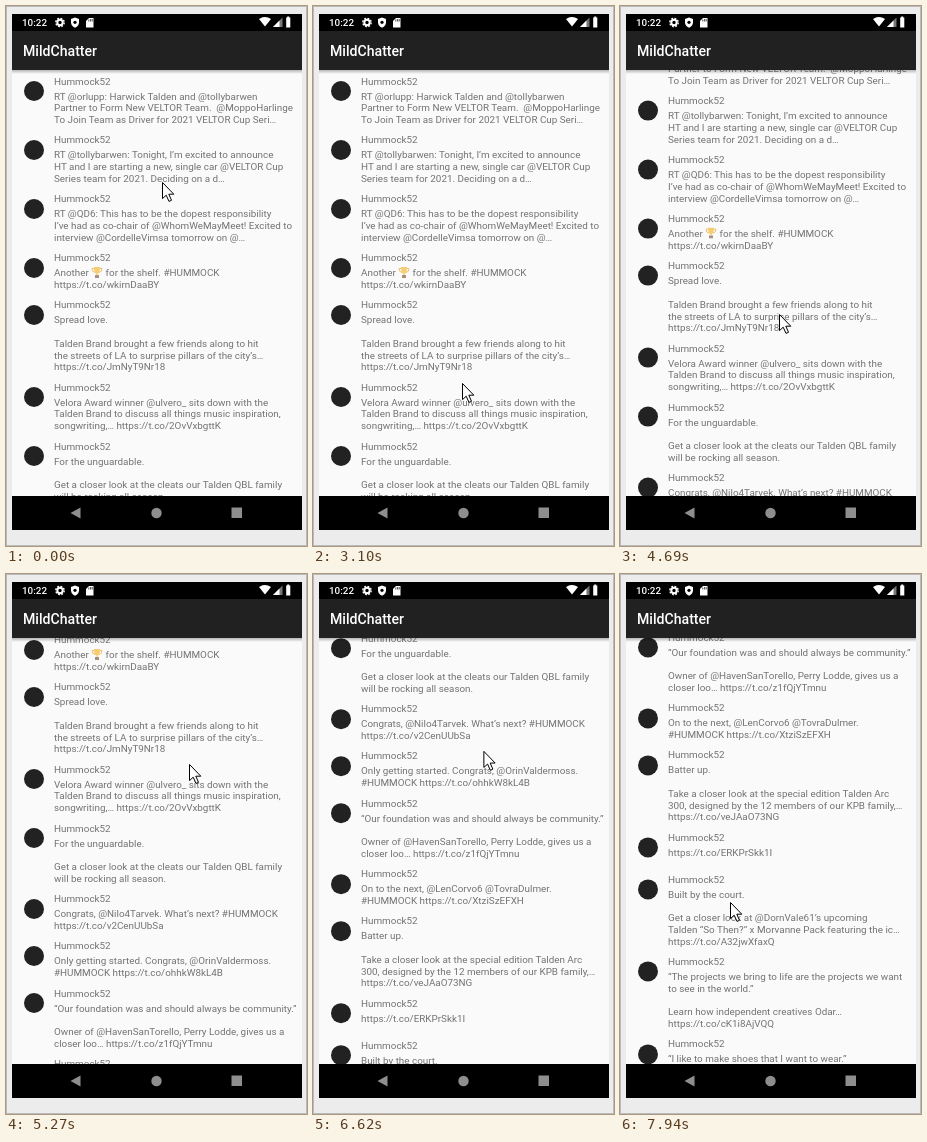
Recreate the animation shown at these times as an HTML page. Size 301x540 px, loop 8 s.

```html
<!DOCTYPE html>
<html lang="en">
<head>
<meta charset="utf-8">
<title>Timeline scroll</title>
<style>
html, body { margin: 0; width: 100%; height: 100%; overflow: hidden; background: #ececec; }
#stage { position: relative; width: 301px; height: 540px; overflow: hidden; background: #ececec;
  box-shadow: inset 0 0 0 1px #bbb; font-family: Roboto, sans-serif; }
#stage > * { position: absolute; }
#screen { left: 6px; top: 64px; width: 290px; height: 426px; overflow: hidden; background: #fafafa; }
#screen::after { content: ""; position: absolute; inset: 0 0 auto; height: 4px;
  background: linear-gradient(#0004, #0000); }
#list { margin: 0; padding: 0; list-style: none; }
#list li { position: relative; box-sizing: border-box; padding: 5.6px 0 0 42px;
  font-size: 9.87px; line-height: 11.7px; color: #737373; white-space: pre; }
#list li::before { content: ""; position: absolute; left: 12px; top: 11px;
  width: 20px; height: 20px; border-radius: 50%; background: #222; }
#list p { margin: 3.3px 0 0; }
#list svg { width: 12px; height: 11px; vertical-align: -2px; }
#bar { left: 6px; top: 8px; width: 290px; height: 56px; color: #fff;
  background: linear-gradient(#000 17px, #212121 17px); }
#bar span { position: absolute; font-weight: 500; white-space: pre; }
#clock { left: 10px; top: 2px; font-size: 9.9px; line-height: 13px; }
#title { left: 11px; top: 29px; font-size: 14.1px; line-height: 17px; }
#nav { left: 6px; top: 490px; width: 290px; height: 34px; background: #000; }
#icons, #cursor { left: 0; top: 0; }
</style>
</head>
<body>
<div id="stage">
  <div id="screen"><ul id="list"></ul></div>
  <div id="bar"><span id="clock">10:22</span><span id="title">MildChatter</span></div>
  <div id="nav"></div>
  <svg id="icons" width="301" height="540" fill="#fff">
    <circle cx="54" cy="16.5" r="2.7" fill="none" stroke="#fff" stroke-width="2"/>
    <circle cx="54" cy="16.5" r="4.2" fill="none" stroke="#fff" stroke-width="1.4" stroke-dasharray="1.8 1.5"/>
    <path d="M69 11.5l4 1.6v3.2q0 3.6-4 5.4q-4-1.8-4-5.4v-3.2z"/>
    <circle cx="69" cy="16.3" r="1.6" fill="#000"/>
    <path d="M83 12h4.5v9.5h-7.5v-6.5z"/>
    <path d="M82.8 13.5v2M84.6 13v2.5M86.2 13v2.5" stroke="#000" stroke-width=".7"/>
    <path d="M253 13q6-4 12 0l-6 7.5z"/>
    <path d="M276.5 11.5v9.5h-9.5z" fill="#777"/><path d="M273.5 14.5v6.5h-6.5z"/>
    <path d="M280.2 11.5h1v-1h2v1h1.1v10h-4.1z"/>
    <g fill="#8e8e8e">
      <path d="M64.5 507l10-5.5v11z"/><circle cx="150.5" cy="507" r="5.2"/><path d="M225.5 501.5h10.5v10.5h-10.5z"/>
    </g>
  </svg>
  <svg id="cursor" width="16" height="24" overflow="visible">
    <path d="M.5 .5V16.6L4.2 13.2L7 19.4L9.5 18.3L6.8 12.2H11.8Z" fill="#fff" stroke="#000"/>
  </svg>
</div>
<script>
const trophy = `<svg viewBox="0 0 12 11"><path d="M3 1.5H1q0 3.5 3 4M9 1.5h2q0 3.5-3 4" fill="none"
  stroke="#ecc070"/><path d="M3 0h6q0 6-2.3 6.5V8h-1.4V6.5Q3 6 3 0z" fill="#f5cd70"/><path
  d="M4 8h4v3H4z" fill="#a89080"/></svg>`;

const posts = [
  "RT @orlupp: Harwick Talden and @tollybarwen\nPartner to Form New VELTOR Team.  @MoppoHarlinge\nTo Join Team as Driver for 2021 VELTOR Cup Seri…",
  "RT @tollybarwen: Tonight, I’m excited to announce\nHT and I are starting a new, single car @VELTOR Cup\nSeries team for 2021. Deciding on a d…",
  "RT @QD6: This has to be the dopest responsibility\nI’ve had as co-chair of @WhomWeMayMeet! Excited to\ninterview @CordelleVimsa tomorrow on @…",
  `Another ${trophy} for the shelf. #HUMMOCK\nhttps://t.co/wkirnDaaBY`,
  "Spread love.\n\nTalden Brand brought a few friends along to hit\nthe streets of LA to surprise pillars of the city’s…\nhttps://t.co/JmNyT9Nr18",
  "Velora Award winner @ulvero_ sits down with the\nTalden Brand to discuss all things music inspiration,\nsongwriting,… https://t.co/2OvVxbgttK",
  "For the unguardable.\n\nGet a closer look at the cleats our Talden QBL family\nwill be rocking all season.",
  "Congrats, @Nilo4Tarvek. What’s next? #HUMMOCK\nhttps://t.co/v2CenUUbSa",
  "Only getting started. Congrats, @OrinValdermoss.\n#HUMMOCK https://t.co/ohhkW8kL4B",
  "“Our foundation was and should always be community.”\n\nOwner of @HavenSanTorello, Perry Lodde, gives us a\ncloser loo… https://t.co/z1fQjYTmnu",
  "On to the next, @LenCorvo6 @TovraDulmer.\n#HUMMOCK https://t.co/XtziSzEFXH",
  "Batter up.\n\nTake a closer look at the special edition Talden Arc\n300, designed by the 12 members of our KPB family,…\nhttps://t.co/veJAaO73NG",
  "https://t.co/ERKPrSkk1I",
  "Built by the court.\n\nGet a closer look at @DornVale61’s upcoming\nTalden “So Then?” x Morvanne Pack featuring the ic…\nhttps://t.co/A32jwXfaxQ",
  "“The projects we bring to life are the projects we want\nto see in the world.”\n\nLearn how independent creatives Odar…\nhttps://t.co/cK1i8AjVQQ",
  "“I like to make shoes that I want to wear.”\n"
];

const list = document.getElementById("list");
const cursor = document.getElementById("cursor");
list.innerHTML = posts.map(text => {
  const lines = text.replace(trophy, "").split("\n").length;
  return `<li style="height:${Math.max(42, 23.8 + 11.7 * lines)}px">Hummock52<p>${text}</p></li>`;
}).join("");

const LOOP = 8000, HOP = 140;
const pose = (end, x, y, scroll = 0, power = 1) => ({ end, x, y, scroll, power });
const poses = [
  pose(0, 156, 176), pose(140, 156, 176),
  // waving the pointer over the list
  pose(670, 146, 65), pose(1440, 141, 377), pose(2410, 138, 87), pose(2680, 138, 87),
  pose(3100, 149, 377), pose(3680, 152, 381), pose(4120, 152, 381),
  // first drag, then back down
  pose(4690, 159, 308, 39.4, 2), pose(5270, 183, 190, 186), pose(5660, 154, 351, 186), pose(5800, 154, 351, 186),
  // second drag, ending in a fling
  pose(6210, 168, 214, 281, 1.5), pose(6480, 174, 165, 350), pose(7400, 155, 227, 485.2, .85), pose(7940, 110, 328, 541.6)
];

// Each move runs in even hops of about HOP ms
function poseAt(time) {
  const i = poses.findIndex(p => p.end > time);
  if (i < 0) return poses.at(-1);
  const a = poses[i - 1], b = poses[i], span = b.end - a.end;
  const hops = Math.round(span / HOP);
  const u = (Math.floor((time - a.end) / span * hops) / hops) ** b.power;
  const mix = key => a[key] + (b[key] - a[key]) * u;
  return { x: mix("x"), y: mix("y"), scroll: mix("scroll") };
}

function draw() {
  const { x, y, scroll } = poseAt(performance.now() % LOOP);
  list.style.transform = `translateY(${-scroll}px)`;
  cursor.style.transform = `translate(${x}px, ${y}px)`;
  requestAnimationFrame(draw);
}
draw();
</script>
</body>
</html>
```
